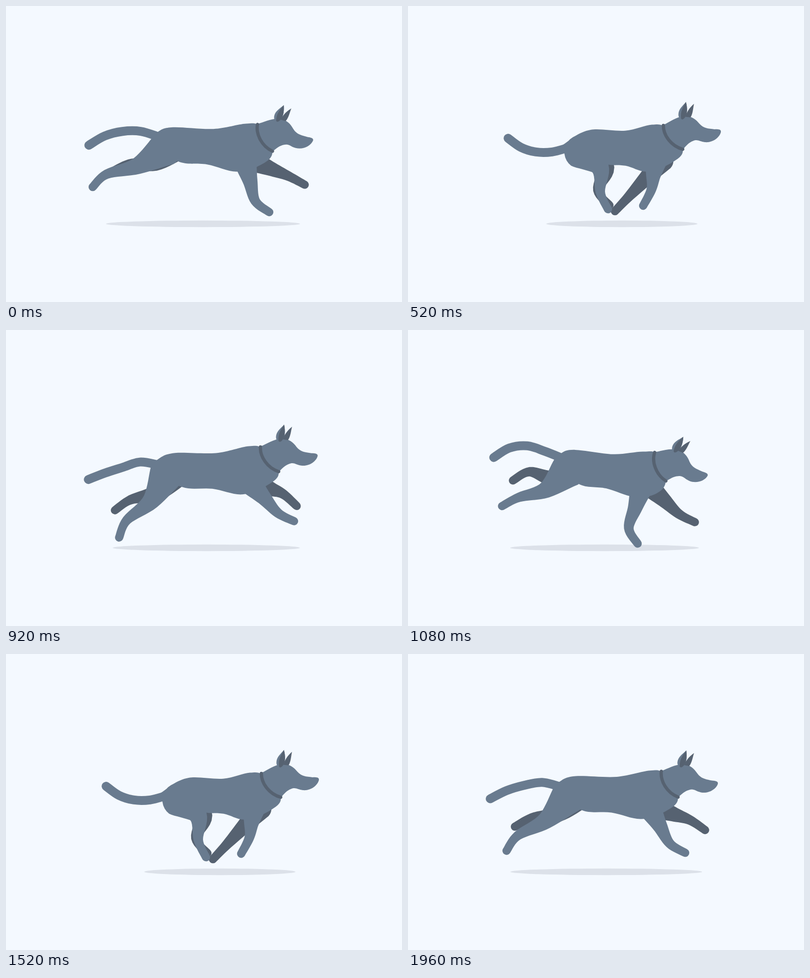
Recreate the animation shown at these times as an HTML page. Size 800 by 600 pixels, loop 2 s.

```html
<!DOCTYPE html>
<html lang="en">
<head>
<meta charset="utf-8">
<title>Running dog</title>
<style>
  html, body { margin: 0; width: 100%; height: 100%; overflow: hidden; background: #f4f9ff; }
  svg { display: block; width: 100%; height: 100%; }
  .coat { fill: #697b8f; }
  .dark { fill: #566271; }
  #tail { fill: none; stroke: #697b8f; stroke-width: 18; stroke-linecap: round; }
  #collar { fill: none; stroke: #566271; stroke-width: 6.5; stroke-linecap: round; }
</style>
</head>
<body>
<svg viewBox="0 0 800 600">
  <ellipse id="shadow" cy="441.5" ry="6.7" fill="#dce1e9"/>
  <path id="farHind" class="dark"/>
  <path id="farFront" class="dark"/>
  <path id="tail"/>
  <path id="torso" class="coat"/>
  <path id="nearHind" class="coat"/>
  <path id="nearFront" class="coat"/>
  <g id="head">
    <path class="coat" d="M0-1C12-8 24-20 40-23C55-25 64-19 72-11C82-2 90-3 104-3C112-4 117-4 117 1C116 12 103 25 87 25C76 25 72 20 63 25C55 29 50 36 44 45C20 40 2 20 0-1Z"/>
    <path class="dark" d="M57-50C51-43 46-37 42-22L53-22C57-30 56-40 57-50Z"/>
    <path class="coat" d="M40.500-52C34-42 27-36 28-25C29-17 36-14 40-18C47-26 45-40 40.500-52Z"/>
    <path class="dark" d="M40.500-52C36-42 31-33 34-18C36-15 38-16 40-18C47-26 45-40 40.500-52Z"/>
    <path id="collar" d="M0 0C2 20 20 40 44 44"/>
  </g>
</svg>
<script>
const CYCLE = 1000, STEP = 40, TURN = 2 * Math.PI / CYCLE, DEG = Math.PI / 180;

// Paw loops: time, x, y. Both front paws run the same loop.
const frontLoop = [[0, 532, 418], [80, 464, 433], [240, 347, 430], [365, 418, 416], [520, 475, 405],
  [605, 560, 387], [760, 586, 357], [820, 603, 358], [960, 560, 403]];
const nearHindLoop = [[0, 175, 367], [80, 190, 357], [240, 233, 356], [520, 404, 412],
  [640, 440, 430], [760, 368, 437], [960, 199, 399]];
const farHindLoop = [[0, 214, 336], [80, 212, 305], [240, 297, 352], [520, 407, 404],
  [640, 355, 435], [760, 268, 423], [960, 216, 350]];

const el = id => document.getElementById(id);
const fmt = p => p[0].toFixed(2) + " " + p[1].toFixed(2);
const add = (p, x, y) => [p[0] + x, p[1] + y];
const mid = (p, q) => [(p[0] + q[0]) / 2, (p[1] + q[1]) / 2];

// Cosine that reaches 1 at the given time of the cycle
const swing = (t, peak) => Math.cos(TURN * (t - peak));

// Mean plus first and second harmonic
function wave(t, mean, c1, s1, c2, s2) {
  const a = TURN * t;
  return mean + c1 * Math.cos(a) + s1 * Math.sin(a) + c2 * Math.cos(2 * a) + s2 * Math.sin(2 * a);
}

// Smooth closed motion through timed points
function along(loop, time) {
  const t = (time + CYCLE) % CYCLE, n = loop.length;
  let k = n - 1;
  while (loop[k][0] > t) k--;
  const [a, b, c, d] = [-1, 0, 1, 2].map(j => {
    const i = k + j, [when, x, y] = loop[(i + n) % n];
    return [when + Math.floor(i / n) * CYCLE, x, y];
  });
  const h = c[0] - b[0], u = (t - b[0]) / h;
  return [1, 2].map(i => {
    const rest = c[i] - b[i], before = b[0] - a[0], after = d[0] - c[0];
    const m0 = ((b[i] - a[i]) / before * h + rest / h * before) / (h + before);
    const m1 = (rest / h * after + (d[i] - c[i]) / after * h) / (h + after);
    return b[i] + u * (h * m0 + u * (3 * rest - h * (2 * m0 + m1) + u * (h * (m0 + m1) - 2 * rest)));
  });
}

function smoothPath(pts, closed) {
  const n = pts.length;
  const at = i => closed ? pts[(i + n) % n] : pts[Math.max(0, Math.min(n - 1, i))];
  const handle = (p, from, to, s) => [0, 1].map(j => p[j] + s * (to[j] - from[j]) / 6);
  let d = "M" + fmt(pts[0]);
  for (let i = 0; i < (closed ? n : n - 1); i++) {
    const p = at(i), q = at(i + 1);
    d += "C" + [handle(p, at(i - 1), q, 1), handle(q, p, at(i + 2), -1), q].map(fmt).join(" ");
  }
  return closed ? d + "Z" : d;
}

// Outline of a limb whose radius changes along a smooth centre line
function limbPath(joints) {
  const n = joints.length, perPart = 8, line = [];
  const at = i => joints[Math.max(0, Math.min(n - 1, i))];
  for (let s = 0; s <= (n - 1) * perPart; s++) {
    const i = Math.min(n - 2, Math.floor(s / perPart)), u = s / perPart - i;
    const [a, b, c, d] = [at(i - 1), at(i), at(i + 1), at(i + 2)];
    line.push(b.map((v, j) => v + u / 2 * (c[j] - a[j] +
      u * (2 * a[j] - 5 * v + 4 * c[j] - d[j] + u * (3 * (v - c[j]) + d[j] - a[j])))));
  }
  const sides = [1, -1].map(side => line.map((p, i) => {
    const a = line[Math.max(0, i - 1)], b = line[Math.min(line.length - 1, i + 1)];
    const dx = b[0] - a[0], dy = b[1] - a[1], k = side * p[2] / (Math.hypot(dx, dy) || 1);
    return [p[0] - dy * k, p[1] + dx * k];
  }));
  const cap = (r, p) => `A${r} ${r} 0 0 0 ${fmt(p)}`;
  const back = sides[1].reverse();
  return "M" + sides[0].map(fmt).join("L") + cap(line[line.length - 1][2], back[0]) +
    "L" + back.map(fmt).join("L") + cap(line[0][2], sides[0][0]) + "Z";
}

// The foot swings from the paw; the knee lies beside the middle of the upper leg
function drawLeg(id, top, paw, foot, footAngle, radii, bulge) {
  const a = footAngle * DEG;
  const ankle = add(paw, -foot * Math.sin(a), -foot * Math.cos(a));
  const dx = ankle[0] - top[0], dy = ankle[1] - top[1], reach = Math.hypot(dx, dy);
  const out = bulge(reach) / reach;
  const knee = add(mid(top, ankle), dy * out, -dx * out);
  const joints = [top, knee, ankle, paw].map((p, i) => [...p, radii[i]]);
  el(id).setAttribute("d", limbPath(joints));
}

function drawLegs(t, hip, shoulder, tuck) {
  const kneeOut = reach => 10 + 0.2 * (121 - reach) + 4 * tuck;
  const hind = (id, top, loop, peak, thigh) => drawLeg(id, top, along(loop, t), 38,
    -14 + 52 * swing(t, peak), [thigh, 17 + 2 * tuck, 9.5, 8.3], kneeOut);
  hind("nearHind", hip, nearHindLoop, 640, 35);
  hind("farHind", add(hip, 20, -4), farHindLoop, 520, 30);

  const front = (id, top, lag, upper) => drawLeg(id, top, along(frontLoop, t - lag), 36,
    10 + 54 * swing(t - lag, 890), [upper, 15, 9.7, 8.3], () => 0);
  front("nearFront", shoulder, 0, 24);
  front("farFront", add(shoulder, 14, 0), 155, 22);
}

// A wave runs down the tail from base to tip
function drawTail(t, base) {
  const pts = [base], part = (138 + 10 * swing(t, 0)) / 4;
  [20, 36, 20, 34].forEach((sway, i) => {
    const a = (2 + sway * swing(t, 115 + 145 * i)) * DEG;
    pts.push(add(pts[i], -part * Math.cos(a), -part * Math.sin(a)));
  });
  el("tail").setAttribute("d", smoothPath(pts, false));
}

function drawTorso(hip, shoulder, neck, throat, tuck) {
  const loin = add(hip, 18, -45), withers = add(neck, -23, -1.5);
  const elbow = add(shoulder, -17, 22), groin = add(hip, 27 + 20 * tuck, 24);
  el("torso").setAttribute("d", smoothPath([
    add(hip, -11 - 16 * tuck, -37 + 15 * tuck), loin,
    add(mid(loin, withers), 8, 7), withers, add(neck, 5, 5),
    throat, add(throat, -22, 26),
    elbow, add(mid(elbow, groin), 0, -4), groin,
    add(hip, -20 - 22 * tuck, -20 + 22 * tuck)
  ], true));
}

function draw(t) {
  const hip = [335 - 16 * swing(t, 40), 293 + 7 * swing(t, 700)];
  const shoulder = [490 + 24 * swing(t, 700), 314 + 5 * swing(t, 260)];
  const tuck = 0.45 + 0.55 * swing(t, 620);

  const neck = [wave(t, 506.7, -3.7, -11.1, 5, -3), wave(t, 246.7, -1.7, 11.5, -5, 0)];
  const tilt = wave(t, 13.5, 4, 15.5, -1.7, 0);
  const cos = Math.cos(tilt * DEG), sin = Math.sin(tilt * DEG);
  const throat = add(neck, 44 * cos - 45 * sin, 44 * sin + 45 * cos);
  el("head").setAttribute("transform", `translate(${neck}) rotate(${tilt})`);

  const left = wave(t, 249, -38, -9.5, -9, 0), right = wave(t, 582.5, 6.5, -18.5, 5, 7);
  el("shadow").setAttribute("cx", (left + right) / 2);
  el("shadow").setAttribute("rx", (right - left) / 2);

  drawTorso(hip, shoulder, neck, throat, tuck);
  drawTail(t, add(hip, -11 - 20 * tuck, -27 + 21 * tuck));
  drawLegs(t, hip, shoulder, tuck);
}

const start = performance.now();
function tick() {
  const elapsed = performance.now() - start;
  draw(Math.floor(elapsed / STEP) * STEP % CYCLE);
  requestAnimationFrame(tick);
}
tick();
</script>
</body>
</html>
```
